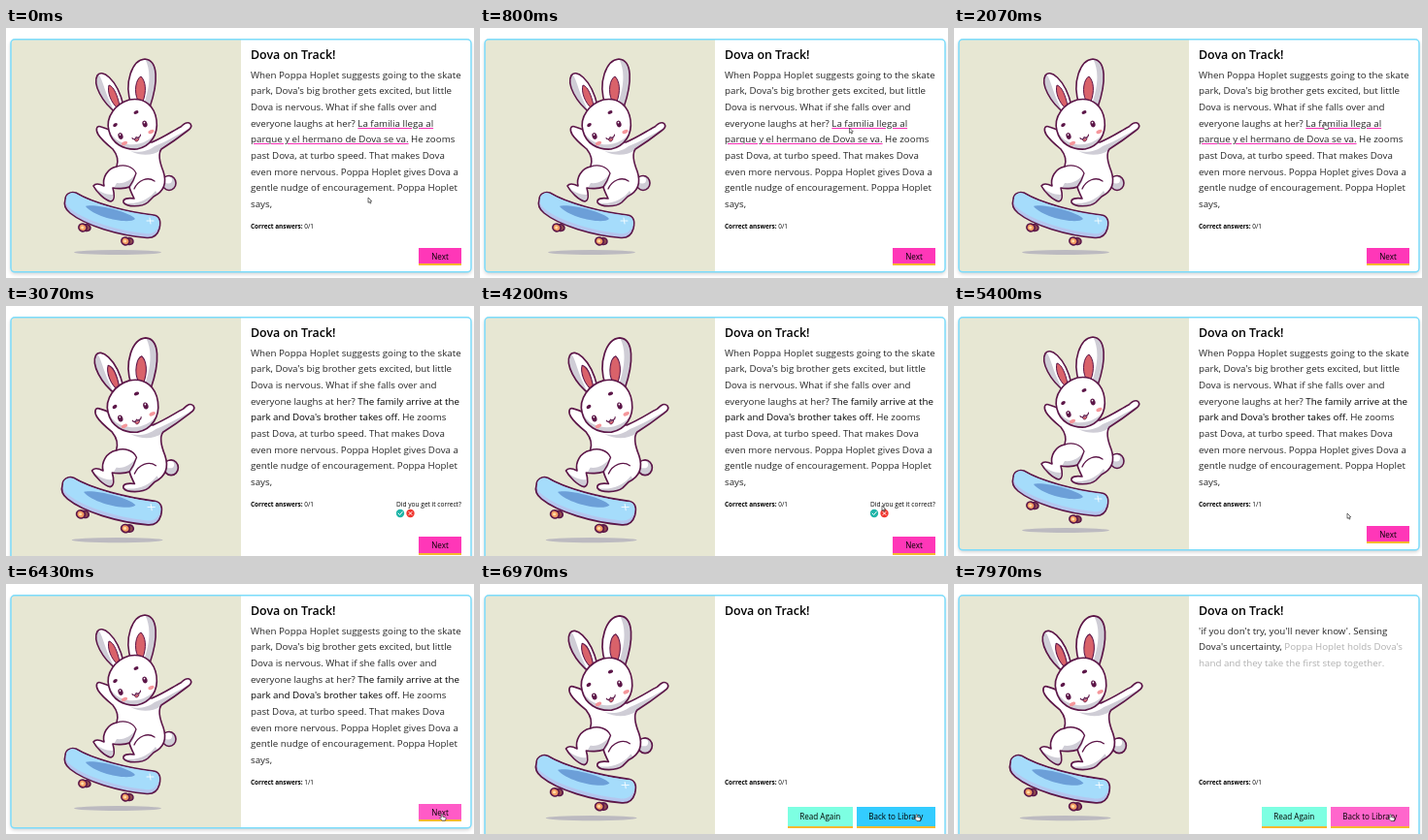
An HTML page with a canvas that plays this animation: 482x258 px, repeating every 8 s.

```html
<!DOCTYPE html>
<html lang="en">
<head>
<meta charset="utf-8">
<title>Reading card</title>
<style>
html, body { margin: 0; width: 100%; height: 100%; overflow: hidden; background: #fff; }
body { position: relative; font-family: "Open Sans", "Noto Sans", sans-serif; color: #262626; }
canvas, h1, p, div { position: absolute; margin: 0; white-space: pre; }
canvas { left: 0; top: 0; }
h1 { left: 252px; top: 18px; font-size: 12.4px; line-height: 19px; font-weight: 600; color: #000; }
p { left: 252px; top: 40.8px; font-size: 9.75px; line-height: 16.65px; }
u { text-decoration: underline #f82fb4 1.4px; text-underline-offset: 1.4px; }
em { font-style: normal; color: #000; }
.small { top: 200px; font-size: 6.4px; line-height: 9px; color: #000; }
#score { left: 252px; }
#ask { left: 402px; font-size: 6.6px; }
.btn { box-sizing: border-box; font-size: 8.1px; font-weight: 500; text-align: center; color: #000; border-bottom: 2px solid #f5b82e; }
#next { left: 425px; width: 44px; height: 18.5px; line-height: 17px; }
#again, #back { top: 230px; height: 21.5px; line-height: 20px; }
#again { left: 316.5px; width: 67.5px; background: #7dffe2; }
#back { left: 387.5px; width: 81.5px; }
</style>
</head>
<body>
<canvas id="scene" width="482" height="258"></canvas>
<h1>Dova on Track!</h1>
<p id="story">When Poppa Hoplet suggests going to the skate
park, Dova's big brother gets excited, but little
Dova is nervous. What if she falls over and
everyone laughs at her? <span id="spanish"><u>La familia llega al
parque y el hermano de Dova se va.</u></span><em id="english">The family arrive at the
park and Dova's brother takes off.</em> He zooms
past Dova, at turbo speed. That makes Dova
even more nervous. Poppa Hoplet gives Dova a
gentle nudge of encouragement. Poppa Hoplet
says,</p>
<p id="ending"><span>'if you don't try, you'll never know'.</span> <span>Sensing
Dova's uncertainty,</span> <span>Poppa Hoplet holds Dova's
hand and they take the first step together.</span></p>
<div id="score" class="small"><b>Correct answers:</b> <span id="count">0/1</span></div>
<div id="ask" class="small">Did you get it correct?</div>
<div id="next" class="btn">Next</div>
<div id="again" class="btn">Read Again</div>
<div id="back" class="btn">Back to Library</div>
<canvas id="pointer" width="482" height="258"></canvas>
<script>
const $ = id => document.getElementById(id);
const g = $('scene').getContext('2d');
const pg = $('pointer').getContext('2d');
const parts = [...$('ending').querySelectorAll('span')];
const LOOP = 8000, REVEAL = 3000, MARKED = 5400, END = 6970;
const INK = '#5c1648', SHADE = '#cfcdd6';

// Pointer keys: time, x, y
const keys = [
  [0, 373, 175], [430, 373, 175], [870, 381, 98], [3570, 381, 98],
  [4200, 414, 206], [4270, 418, 226], [4430, 418, 226], [4600, 405, 214],
  [5970, 405, 214], [6470, 449, 238], [LOOP, 449, 238]
];

const ramp = (t, a, b) => Math.min(1, Math.max(0, (t - a) / (b - a)));
const smooth = k => k * k * (3 - 2 * k);
const mix = (a, b, k) => `rgb(${a.map((v, i) => Math.round(v + (b[i] - v) * k))})`;
const show = (el, on) => { el.style.display = on ? '' : 'none'; };

function shape(d, fill, line = INK, w = 1.6) {
  const path = new Path2D(d);
  if (fill) { g.fillStyle = fill; g.fill(path); }
  if (line) { g.strokeStyle = line; g.lineWidth = w; g.stroke(path); }
}

function oval(x, y, rx, ry, turn, fill, line) {
  g.beginPath();
  g.ellipse(x, y, rx, ry, turn, 0, 7);
  g.fillStyle = fill;
  g.fill();
  if (line) { g.strokeStyle = line; g.lineWidth = 1.6; g.stroke(); }
}

// Fills an outline, paints shading inside it, then strokes it
function shaded(d, paint) {
  shape(d, '#fff', null);
  g.save();
  g.clip(new Path2D(d));
  paint();
  g.restore();
  shape(d);
}

function board() {
  oval(115, 231.5, 45, 2.5, 0, '#bcbac0');
  for (const [x, y] of [[79, 206], [123, 220]]) {
    oval(x + 4, y, 4, 3.4, .3, '#8d4a4e', INK);
    oval(x, y, 4.2, 3.8, .3, '#f29b62', INK);
    oval(x - .4, y, 1.5, 1.4, 0, '#ffe0a8');
  }
  shape('M61 177C61 172 66 168 72 170C90 181 126 190 152 193C158 194 160 199 158 207C156 214 152 217 145 216.5C116 214 82 204 66 191C61 187 59 183 61 177Z', '#b4c6ee');
  shape('M62 176C62 172 67 169 72 171C90 182 126 191 152 194C157 195 159 200 157 205C154 211 150 213 143 212C116 209 84 200 67 187C63 184 61 180 62 176Z', '#a5dcfb', null);
  shape('M82 184C90 181 126 189 133 197C127 203 92 196 82 184Z', '#6c9fd8', null);
  shape('M145 199L152 199M148 196L149 202', null, '#effaff', 1);
}

function ears() {
  shaded('M114 88C99 77 89 58 94 49C98 42 114 51 121 80Z', () =>
    shape('M92 45C99 48 100 62 107 76L113 90L92 82Z', SHADE, null));
  shape('M115 83C108 77 104 66 106 59C111 60 115 70 117 80Z', '#d9626a', INK, 1);
  shaded('M129 79C121 56 130 33 143 32C157 33 157 56 148 82Z', () =>
    shape('M142 30C150 42 149 62 140 84L160 84L160 30Z', SHADE, null));
  shape('M136 75C131 66 134 52 139 50C144 55 145 65 141 76Z', '#d9626a', INK, 1);
}

function face() {
  shaded('M106 106C102 92 113 78 127 74C143 71 153 81 155 95C157 110 149 122 135 125C121 126 109 119 106 106Z', () => {
    g.fillStyle = SHADE;
    g.fillRect(100, 95, 60, 35);
    oval(132, 97, 27, 23, -.25, '#fff');
  });
  oval(112.5, 100, 2.5, 1.7, -.6, INK);
  oval(134, 87, 2.6, 1.7, -.4, INK);
  for (const [x, y] of [[118, 111.5], [143, 99]]) {
    oval(x, y, 2.5, 3.4, -.3, INK);
    oval(x - .5, y - 1.4, .8, .9, 0, '#fff');
  }
  oval(122, 119, 3.2, 1.8, -.4, '#f5979b');
  oval(149.5, 107, 3.2, 1.8, -.4, '#f5979b');
  shape('M130 113.5C131 115.5 133.5 115 134 112.5C136 114 138.5 112.5 138.5 110', null, INK, 1.1);
  shape('M132.5 115.5C133.5 118.5 137 117 137 113.5Z', '#de6970', INK, .8);
}

function rabbit() {
  oval(168, 160, 7, 7.5, 0, SHADE, INK);
  oval(167, 157, 4, 3.5, 0, '#fff');
  ears();
  shaded('M110 125C104 120 98 115 95 110C92 105 93 100 98 102C106 104 113 108 122 114L150 118C164 112 172 106 180 102C184 98 187 96 190 99C192 102 190 104 187 106C178 113 168 120 160 125C157 129 158 138 162 148C166 160 162 169 152 174L146 180C140 185 124 185 121 180C120 176 126 175 132 176C130 172 128 168 127 164C122 166 114 166 110 165C112 172 112 178 108 179C102 178 93 169 90 163C92 160 97 161 101 163C99 155 104 145 114 143C116 137 114 130 110 125Z', () => {
    shape('M192 102C177 110 166 117 153 122C147 127 137 129 128 127C140 133 152 131 158 127L192 110Z', SHADE, null);
    shape('M90 163C96 169 102 172 110 172L109 181C101 178 94 172 90 163ZM121 180C132 183 147 178 154 168L158 174L144 188L122 185Z', SHADE, null);
    shape('M114 160C122 161 129 157 134 150C133 158 130 163 126 168L110 167Z', SHADE, null);
  });
  shape('M114 143C122 140 131 143 134 150C132 156 130 160 127 164M132 166C136 157 146 153 153 158', null, INK, 1.3);
  face();
}

function card(h) {
  g.beginPath();
  g.roundRect(5, 11.8, 474, h, 4);
}

function scene(tall) {
  const h = tall ? 251 : 240;
  const zoom = h / 240;
  g.clearRect(0, 0, 482, 258);
  g.lineJoin = g.lineCap = 'round';

  g.save();
  g.shadowColor = 'rgba(0,0,0,.2)';
  g.shadowBlur = 4;
  g.shadowOffsetY = 2;
  card(h);
  g.fillStyle = '#fff';
  g.fill();
  g.restore();

  g.save();
  g.clip();
  g.fillStyle = '#e7e7d3';
  g.fillRect(5, 11, 237, h + 2);
  g.translate(123.5, 12);
  g.scale(zoom, zoom);
  g.translate(-123.5, -12);
  board();
  rabbit();
  g.restore();

  card(h);
  g.strokeStyle = '#7cdcfb';
  g.lineWidth = 1.5;
  g.stroke();
}

function marks() {
  oval(406, 214, 4.2, 4.2, 0, '#20b5a8');
  oval(416.5, 214, 4.2, 4.2, 0, '#f0372f');
  shape('M404 214L405.6 215.6L408.2 212.5M415 212.5L418 215.5M418 212.5L415 215.5', null, '#fff', 1);
}

function pointerAt(t) {
  const i = keys.findIndex(k => k[0] > t);
  const [t0, x0, y0] = keys[i - 1], [t1, x1, y1] = keys[i];
  const k = smooth(ramp(t, t0, t1));
  return [x0 + (x1 - x0) * k, y0 + (y1 - y0) * k];
}

function pointer(t) {
  pg.clearRect(0, 0, 482, 258);
  if (t >= REVEAL && t < 3570) return;
  const [x, y] = pointerAt(t);
  const hand = t > 830 && t < REVEAL || t > 4570 && t < MARKED || x > 425 && y > 226;
  const d = hand
    ? 'M0 0C.8-.6 1.6 0 1.6 .8V2.6L4 3.1C5 3.4 5 4 4.7 5L4.2 6.6H1L-1.4 3.8C-1.3 3-.6 3 0 3.6Z'
    : 'M0 0V5.3L1.2 4.3L2.1 6.1L3 5.7L2.2 3.9L3.8 3.8Z';
  const path = new Path2D(d);
  pg.save();
  pg.translate(x, y);
  pg.fillStyle = '#fff';
  pg.fill(path);
  pg.strokeStyle = '#333';
  pg.lineWidth = .7;
  pg.stroke(path);
  pg.restore();
}

function draw(t) {
  const answer = t >= REVEAL && t < MARKED;
  const end = t >= END;
  scene(answer || end);
  if (answer) marks();

  show($('story'), !end);
  show($('spanish'), t < REVEAL);
  show($('english'), t >= REVEAL);
  show($('ending'), end);
  show($('ask'), answer);
  show($('next'), !end);
  show($('again'), end);
  show($('back'), end);
  $('count').textContent = t >= MARKED && !end ? '1/1' : '0/1';

  const next = $('next').style;
  next.top = (answer ? 238 : 226.5) + 'px';
  next.background = mix([255, 55, 184], [255, 102, 204], ramp(t, 6300, 6470));
  $('back').style.background = mix([51, 204, 255], [255, 102, 204], ramp(t, END + 10, 7130));

  parts[0].style.opacity = ramp(t, 7240, 7300);
  parts[1].style.opacity = ramp(t, 7870, 7970);
  parts[2].style.opacity = ramp(t, 7870, 8150);
  pointer(t);
}

const start = performance.now();
function frame() {
  draw((performance.now() - start) % LOOP);
  requestAnimationFrame(frame);
}
frame();
</script>
</body>
</html>
```
